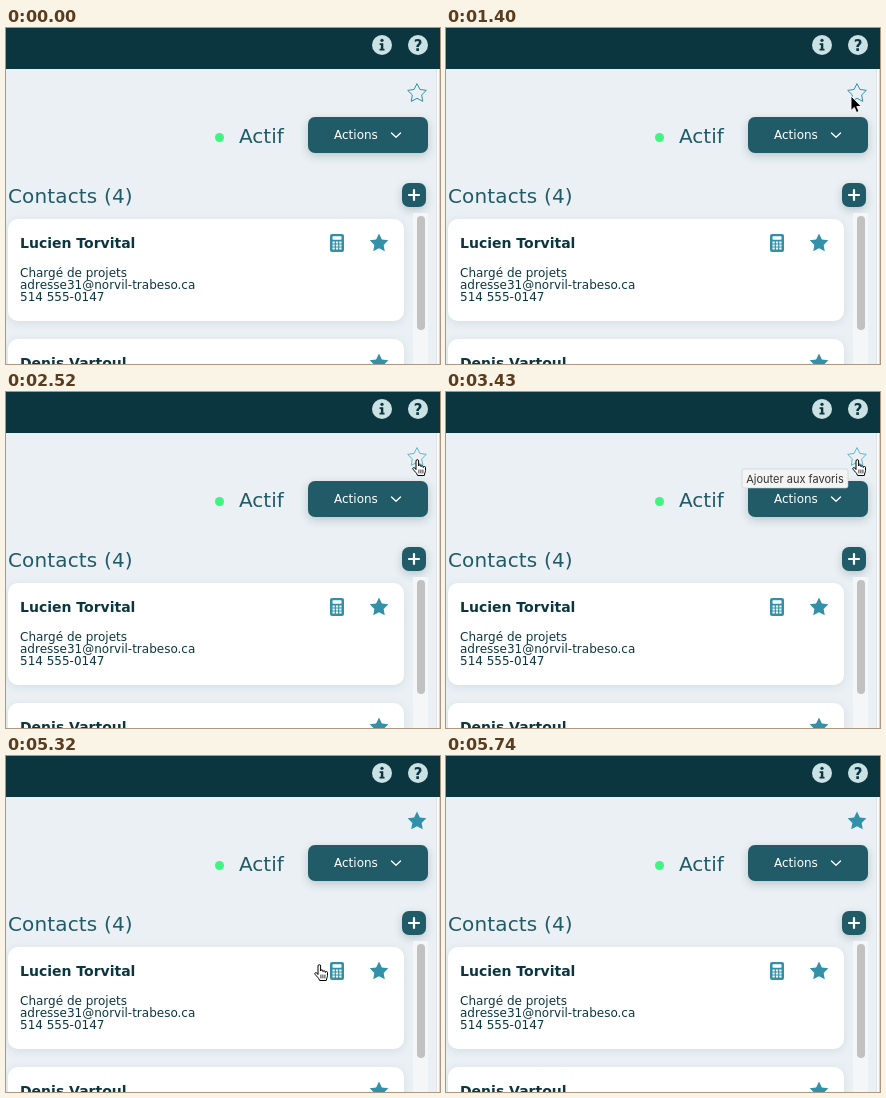
An HTML page for the animation above (6.09 s loop, 434 by 336 pixels).

```html
<!DOCTYPE html>
<html lang="fr">
<head>
<meta charset="utf-8">
<title>Contacts</title>
<style>
  html, body { margin: 0; width: 100%; height: 100%; overflow: hidden; background: #eaf0f4; }
  svg { display: block; width: 434px; height: 336px; font-family: "DejaVu Sans", Verdana, sans-serif; }
  .title { font-size: 20px; fill: #215b68; }
  .name { font-size: 14px; font-weight: 700; fill: #0b3640; }
  .info { font-size: 12px; fill: #0b3640; }
  .card { fill: #fff; filter: drop-shadow(0 2px 4px rgba(20, 60, 75, .09)); }
  .button { fill: #215b68; filter: drop-shadow(0 3px 4px rgba(20, 50, 60, .22)); }
  .line { fill: none; stroke: #fff; stroke-linecap: round; stroke-linejoin: round; }
</style>
</head>
<body>
<svg viewBox="0 0 434 336">
  <defs>
    <path id="star" stroke-linejoin="round"/>
  </defs>
  <rect width="434" height="336" fill="#eaf0f4"/>
  <rect x="430" y="41" width="4" height="295" fill="#fafafa"/>
  <path d="M430.5 41V336" stroke="#e0e4e7"/>
  <path d="M433.5 41V336" stroke="#d0d2d4"/>
  <rect width="434" height="41" fill="#0b3640"/>

  <g fill="#cbe2e4">
    <circle cx="376" cy="17" r="10"/>
    <circle cx="412" cy="17" r="10"/>
  </g>
  <g fill="#0b3640">
    <circle cx="376" cy="12.3" r="1.6"/>
    <path d="M373.6 15.2h3.7v5.6h1.2v1.7h-5v-1.7h1.4v-3.9h-1.3z"/>
    <text x="412" y="22.6" font-size="15" font-weight="700" text-anchor="middle">?</text>
  </g>

  <use id="fav" href="#star" x="411" y="65"/>

  <circle cx="213.5" cy="109.5" r="4.5" fill="#3ff57f"/>
  <text class="title" x="233" y="115">Actif</text>
  <rect class="button" x="302" y="89" width="120" height="36" rx="7"/>
  <text x="328" y="111" font-size="12" fill="#fff">Actions</text>
  <path class="line" d="M385.5 105l4.5 4.3 4.5-4.3" stroke-width="1.3"/>

  <text class="title" x="2" y="175" letter-spacing=".15">Contacts (4)</text>
  <rect class="button" x="396" y="155" width="24" height="24" rx="7"/>
  <path class="line" d="M403 167h10M408 162v10" stroke-width="2.2"/>

  <rect x="407" y="185" width="15" height="151" fill="#f4f6f7"/>
  <rect x="411" y="188" width="8" height="114" rx="4" fill="#c1c1c1"/>

  <rect class="card" x="2" y="191" width="396" height="102" rx="10"/>
  <text class="name" x="14" y="220">Lucien Torvital</text>
  <text class="info" x="14" y="249">Chargé de projets</text>
  <text class="info" x="14" y="261">adresse31@norvil-trabeso.ca</text>
  <text class="info" x="14" y="273">514 555-0147</text>
  <g fill="#3291a9">
    <rect x="324" y="206" width="14" height="18" rx="2"/>
    <use href="#star" x="373" y="215"/>
  </g>
  <g fill="#fff">
    <rect x="326.5" y="208.3" width="9" height="3.4" rx=".6"/>
    <path id="keys"/>
  </g>

  <rect class="card" x="2" y="311" width="396" height="102" rx="10"/>
  <text class="name" x="14" y="340">Denis Vartoul</text>
  <use href="#star" x="373" y="335" fill="#3291a9"/>

  <g id="tip">
    <rect x="296" y="77" width="106" height="19" rx="2" fill="#f4f4f4" stroke="#c8c8c8" stroke-width=".6"/>
    <text x="349" y="90.5" text-anchor="middle" font-size="11" fill="#333" font-family="Inter, sans-serif">Ajouter aux favoris</text>
  </g>
  <circle id="ring" fill="#808080" fill-opacity=".15" stroke="#808080" stroke-opacity=".4"/>

  <path id="arrow" d="M0 0V14.5L3.3 11.4 5.5 16.5 8 15.4 5.8 10.5H10.3Z" stroke="#fff" stroke-width=".9"/>
  <g id="hand" stroke="#000" stroke-linejoin="round" stroke-linecap="round">
    <path fill="#fff" d="M4 10.2V2a1.3 1.3 0 0 1 2.6 0V7a1.2 1.2 0 0 1 2.4 0v.6a1.2 1.2 0 0 1 2.3.2v.7a1.1 1.1 0 0 1 2.2.2V11.5c0 2-1 2.6-1.2 5H5.6C5 14 2.6 12.5 1 10.2C.2 9 1.6 8 2.6 8.8Z"/>
    <path fill="none" stroke-width=".8" d="M6.9 11v3M8.9 11v3M10.9 11v3"/>
  </g>
</svg>
<script>
const LOOP = 6090, TICK = 70;
const $ = id => document.getElementById(id);
const set = (id, attrs) => {
  for (const k in attrs) $(id).setAttribute(k, attrs[k]);
};
const show = (id, on) => set(id, { display: on ? "inline" : "none" });

// Pointer moves: first tick, last tick, x, y, easing power
const start = [189, 390];
const moves = [
  [70, 280, 392, 116, 1],
  [420, 910, 412, 63, .75],
  [1120, 1120, 410, 64, 1],
  [1260, 1400, 405, 68, 1],
  [1890, 1960, 405, 70, 1],
  [2100, 2240, 404, 68, 1],
  [2450, 2520, 406, 67, 1],
  [5180, 5320, 308, 208, 2],
  [5390, 5460, 188, 312, 1],
  [5530, 5670, 2, 332, 1]
];
// Clicks: begin, end, x, y
const clicks = [[1610, 1750, 406, 69], [4200, 4410, 411, 67]];

function pointer(t) {
  let [x, y] = start;
  for (const [from, to, tx, ty, pow] of moves) {
    if (t < from) break;
    const k = Math.min(1, (t - from + TICK) / (to - from + TICK)) ** pow;
    x += (tx - x) * k;
    y += (ty - y) * k;
  }
  return `translate(${x.toFixed(1)} ${y.toFixed(1)})`;
}

function starPath() {
  const pts = [];
  for (let i = 0; i < 10; i++) {
    const r = i % 2 ? 4.9 : 9.8, a = i * Math.PI / 5;
    pts.push((r * Math.sin(a)).toFixed(2) + " " + (.4 - r * Math.cos(a)).toFixed(2));
  }
  return "M" + pts.join("L") + "Z";
}

function keyPath() {
  let d = "";
  for (let i = 0; i < 9; i++) {
    d += `M${326.5 + i % 3 * 3.4} ${213.6 + Math.floor(i / 3) * 3}h2.2v1.8h-2.2z`;
  }
  return d;
}

function draw(time) {
  const t = Math.floor(time % LOOP / TICK) * TICK;
  const at = pointer(t);
  set("arrow", { transform: at });
  set("hand", { transform: at });
  show("arrow", t >= 70 && t < 1890);
  show("hand", t >= 1890 && t < 5740);

  const hover = t >= 1890 && t < 5250;
  const color = hover ? "#5bb9d3" : "#3291a9";
  const filled = t >= 4270;
  set("fav", { fill: filled ? color : "none", stroke: filled ? "none" : color });

  show("tip", t >= 3360 && t < 4550);
  set("tip", { opacity: t < 3430 ? .5 : 1 });

  const click = clicks.find(([a, b]) => t >= a && t < b);
  show("ring", click);
  if (click) {
    const [a, b, cx, cy] = click;
    const k = (t - a + TICK) / (b - a);
    set("ring", { cx, cy, r: 12 + 19 * k, opacity: 1.1 - .6 * k });
  }
}

set("star", { d: starPath() });
set("keys", { d: keyPath() });
const begin = performance.now();
function frame() {
  draw(performance.now() - begin);
  requestAnimationFrame(frame);
}
frame();
</script>
</body>
</html>
```
